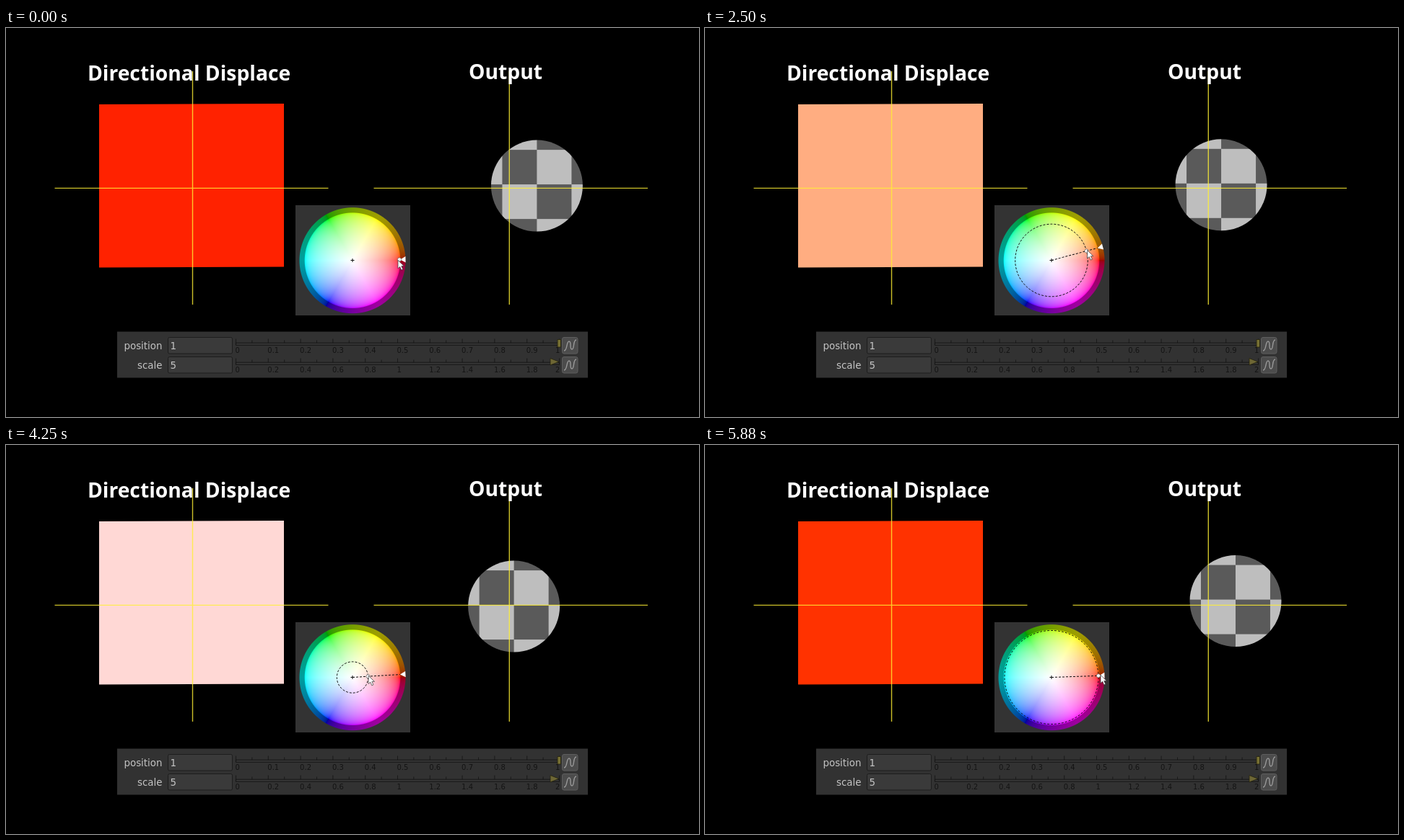
Animation of 960 by 540 pixels, one loop 6000 ms. Source, as an HTML page with a canvas:

```html
<!DOCTYPE html>
<html lang="en">
<head>
<meta charset="utf-8">
<title>Directional Displace</title>
<style>
  html, body { margin: 0; width: 100%; height: 100%; overflow: hidden; background: #000; }
  #stage { position: relative; width: 960px; height: 540px; overflow: hidden; background: #000; }
  canvas { position: absolute; left: 401px; top: 246px; }
  svg { position: absolute; left: 0; top: 0; }
  .title { font: bold 28.25px "Noto Sans", "Open Sans", sans-serif; fill: #fff; }
  .label { font: 13.4px "DejaVu Sans", sans-serif; fill: #c4c4c4; }
  .num { font: 10px "DejaVu Sans", sans-serif; fill: #141414; }
  .axes { fill: none; stroke: #fff032; stroke-opacity: .8; stroke-width: 1.4; }
  .dash { fill: none; stroke: #111; stroke-width: 1; stroke-dasharray: 3 2; }
</style>
</head>
<body>
<div id="stage">
  <canvas id="wheel" width="159" height="153"></canvas>
  <svg width="960" height="540" viewBox="0 0 960 540">
    <defs>
      <pattern id="checks" x="0" y="-2" width="96" height="96" patternUnits="userSpaceOnUse">
        <path fill="#5a5a5a" d="M0 0H96V96H0Z"/>
        <path fill="#bebebe" d="M0 0H48V48H96V96H48V48H0Z" transform="translate(-48 0)"/>
        <path fill="#bebebe" d="M48 0H96V48H48ZM0 48H48V96H0Z"/>
      </pattern>
    </defs>

    <path id="swatch" d="M129 106L385 105V331.5L129 332.5Z"/>
    <circle id="ball" r="63.5" fill="url(#checks)"/>
    <path class="axes" d="M67.5 222.4H446.5M258.5 60V384M509.5 222.4H889M697.3 60V384"/>
    <text class="title" x="112.9" y="73">Directional Displace</text>
    <text class="title" x="641" y="71">Output</text>

    <path fill="#323232" d="M154 421.5H806V485.5H154Z"/>
    <g id="rows"></g>
    <path fill="#777033" stroke="#24230f" stroke-width=".8" d="M764 432.5H768.5V443H764Z"/>
    <path fill="#6e6735" stroke="#24230f" stroke-width=".8" d="M754 458.5L766 463.3 754 468Z"/>

    <g transform="translate(480 322.5)">
      <g id="drag">
        <circle id="ring" class="dash"/>
        <path id="ray" class="dash" d="M0 0H66"/>
      </g>
      <path d="M-2.5 0H2.5M0 -2.5V2.5" stroke="#111"/>
      <path id="marker" d="M66 0L73.5 -4.2V4.2Z" fill="#fff"/>
      <circle id="knob" r="2.6" fill="#fff" stroke="#444" stroke-width=".6"/>
      <path id="cursor" d="M0 0V11.4L2.7 9 4.7 13.6 6.8 12.6 4.8 8.2H8.3Z" fill="#fff" stroke="#333" stroke-width=".7"/>
    </g>
  </svg>
</div>
<script>
const LOOP = 6000, RADIUS = 64.5;
const $ = id => document.getElementById(id);

// time, handle right, handle up, cursor lead
const steps = [
  [0, 65, 1.1, -2], [170, 65, 1.1, -1], [290, 65, 2.2, 1], [460, 65, 2.5, 1],
  [830, 45.5, 2.3, 1], [1670, .5, .2, 1], [1960, .5, .2, 1],
  [2500, 48.5, 13, 1], [2580, 54.5, 14.8, 1], [3000, 61, 17, 1], [3170, 61, 17, 1],
  [3580, 62.3, 17.6, 1], [3790, 62.3, 17.6, 1], [4250, 21.7, 1.3, .5],
  [4380, 10, .7, .5], [4550, 8, .4, .5], [5000, 29, .3, .5], [5290, 50.5, .5, 1],
  [5630, 64, 1, 2], [5880, 65, 2.2, 3], [LOOP, 65, 2.2, 3]
];

const encode = v => v <= .0031308 ? v * 12.92 : 1.055 * v ** (1 / 2.4) - .055;
const clamp = v => Math.min(1, Math.max(0, v));

// display colour for a hue in degrees and a linear saturation
function colour(hue, sat) {
  return [0, 2, 4].map(k => {
    const d = Math.abs(((hue / 60 - k) % 6 + 9) % 6 - 3);
    return encode(1 - sat * (1 - clamp(2 - d)));
  });
}

function paintWheel() {
  const c = $("wheel"), g = c.getContext("2d");
  const img = g.createImageData(c.width, c.height);
  for (let y = 0, i = 0; y < c.height; y++) {
    for (let x = 0; x < c.width; x++, i += 4) {
      const dx = x + .5 - 79, dy = 76.7 - y - .5, r = Math.hypot(dx, dy);
      const rgb = colour(Math.atan2(dy, dx) * 180 / Math.PI, Math.min(1, r / 66));
      const shade = 1 - .38 * clamp(r - 65.8), cover = clamp(74 - r);
      rgb.forEach((v, k) => img.data[i + k] = 51 + (v * shade * 255 - 51) * cover);
      img.data[i + 3] = 255;
    }
  }
  g.putImageData(img, 0, 0);
}

function sliderRow(name, value, max, y) {
  let ticks = "", nums = "";
  for (let i = 0; i <= 20; i++) {
    const x = 318.5 + i * 22.4;
    ticks += `M${x} ${i % 2 ? y - 4.5 : y - 6.5}V${y}`;
    if (i % 2 == 0) {
      const left = i == 20 ? 761 : x - 1;
      nums += `<text class="num" x="${left}" y="${y + 13}">${+(max * i / 20).toFixed(1)}</text>`;
    }
  }
  return `<text class="label" x="216.5" y="${y + 7.5}" text-anchor="end">${name}</text>
    <rect x="224.5" y="${y - 8.5}" width="89" height="22.5" rx="2" fill="#3a3a3a" stroke="#1d1d1d"/>
    <text class="label" x="227.5" y="${y + 7.5}">${value}</text>
    <path d="${ticks}" stroke="#1a1a1a"/>
    <rect x="318.5" y="${y - .8}" width="448" height="3" fill="#383838" stroke="#141414"/>${nums}
    <rect x="770.5" y="${y - 8.5}" width="21.5" height="22.5" rx="2.5" fill="#4c4c4c" stroke="#5e5e5e"/>
    <path d="M773 ${y + 10}C778 ${y + 10} 776 ${y - 3} 780 ${y - 3}S780 ${y + 8} 784 ${y + 8} 785 ${y - 5} 790 ${y - 5}"
      fill="none" stroke="#999" stroke-width="1.4"/>`;
}

function pose(t) {
  const n = steps.findIndex(s => s[0] > t), a = steps[n - 1], b = steps[n];
  const k = (t - a[0]) / (b[0] - a[0]);
  return [1, 2, 3].map(i => a[i] + (b[i] - a[i]) * k);
}

const move = (id, x, y) => $(id).setAttribute("transform", `translate(${x} ${y})`);

function draw(t) {
  const [x, up, lead] = pose(t);
  const r = Math.hypot(x, up), hue = Math.atan2(up, x) * 180 / Math.PI;
  const [R, G, B] = colour(hue, Math.min(1, r / RADIUS));

  // the ball follows the displayed hue and saturation
  const push = 38.5 * (R - B);
  const angle = R - B > .0001 ? (G - B) / (R - B) * Math.PI / 3 : 0;
  move("ball", 697.3 + push * Math.cos(angle), 224.5 - push * Math.sin(angle));
  $("swatch").setAttribute("fill", `rgb(${[R, G, B].map(v => Math.round(v * 255))})`);

  $("drag").setAttribute("visibility", t < 170 ? "hidden" : "visible");
  $("ring").setAttribute("r", Math.min(r, 65.3));
  for (const id of ["ray", "marker"]) $(id).setAttribute("transform", `rotate(${-hue})`);
  move("knob", x, -up);
  move("cursor", x + lead, -up - (lead < 0 ? -1 : 1));
}

paintWheel();
$("rows").innerHTML = sliderRow("position", 1, 1, 438) + sliderRow("scale", 5, 2, 465);
const start = performance.now();
function tick() {
  draw((performance.now() - start) % LOOP);
  requestAnimationFrame(tick);
}
tick();
</script>
</body>
</html>
```
